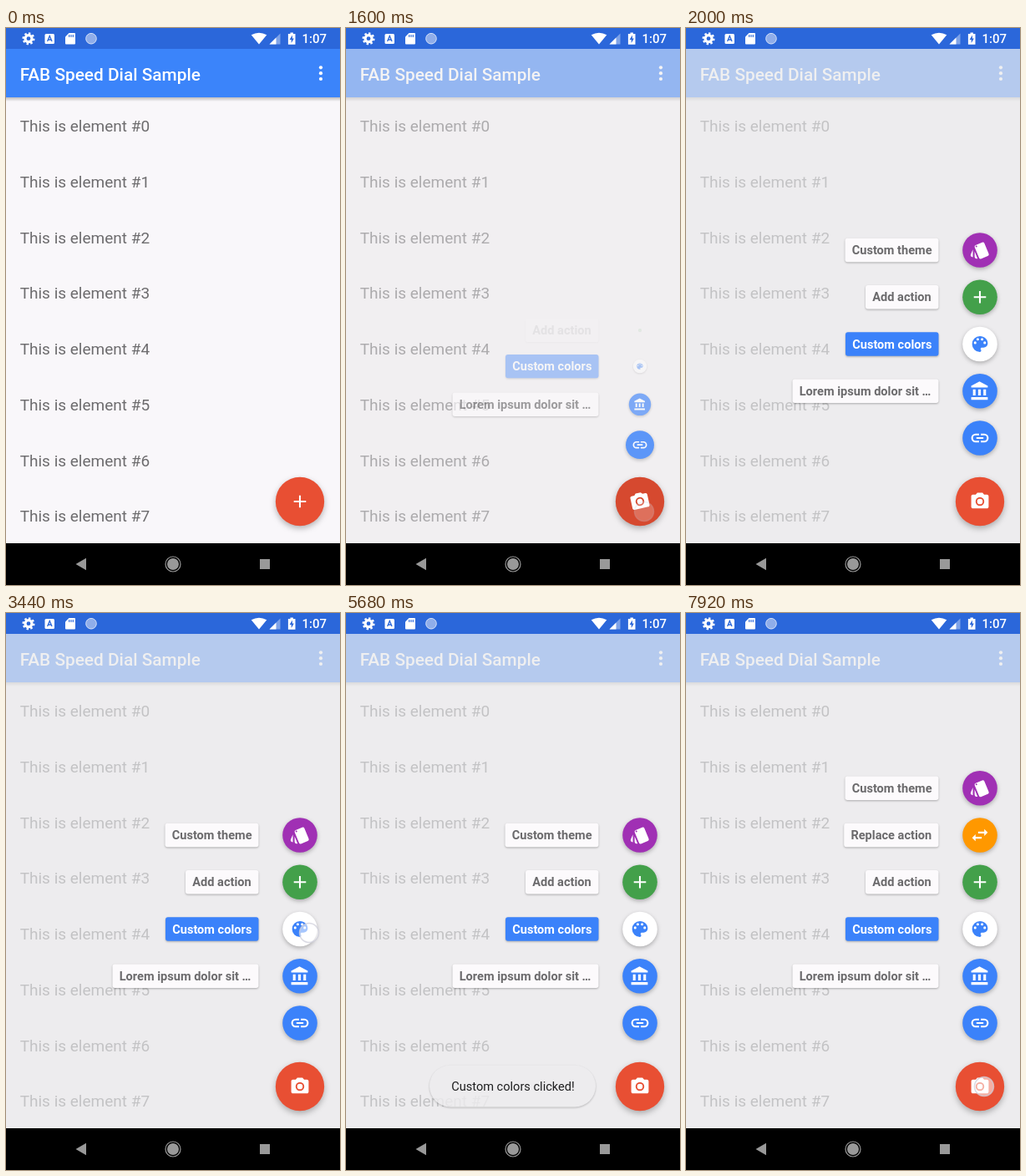
Recreate the animation shown at these times as an HTML page. Size 400 by 667 pixels, loop 8000 ms.

```html
<!DOCTYPE html>
<html lang="en">
<head>
<meta charset="utf-8">
<title>FAB Speed Dial Sample</title>
<style>
  html, body { margin: 0; height: 100%; overflow: hidden; background: #f9f7fa; }
  svg { display: block; width: 100vw; height: 100vh; font-family: Roboto, sans-serif; }
  .title { font-size: 20.83px; font-weight: 500; fill: #fff; }
  .row { font-size: 19px; fill: #6d6c6e; }
  .label { font-size: 14.58px; font-weight: 700; }
  .card { filter: drop-shadow(0 1px 1px rgba(0, 0, 0, .28)); }
  .fab { filter: drop-shadow(0 2px 2.5px rgba(0, 0, 0, .27)); }
  .main { filter: drop-shadow(0 3px 3.5px rgba(0, 0, 0, .28)); }
</style>
</head>
<body>
<svg id="stage" viewBox="0 0 400 667">
  <defs>
    <linearGradient id="shade" x2="0" y2="1">
      <stop stop-opacity=".24"/><stop offset="1" stop-opacity="0"/>
    </linearGradient>
  </defs>
  <rect width="400" height="667" fill="#f9f7fa"/>
  <g id="rows"></g>
  <rect y="83" width="400" height="5" fill="url(#shade)"/>
  <rect y="25" width="400" height="58" fill="#3b84fa"/>
  <text class="title" x="16.7" y="62.5">FAB Speed Dial Sample</text>
  <g fill="#fff">
    <circle cx="377" cy="47.3" r="2.1"/><circle cx="377" cy="54.2" r="2.1"/><circle cx="377" cy="61" r="2.1"/>
  </g>
  <rect id="overlay" y="25" width="400" height="592" fill="#e9e8ea"/>

  <g id="status">
    <rect width="400" height="25" fill="#2b67da"/>
    <g fill="none" stroke="#fff">
      <circle cx="27" cy="12.7" r="4" stroke-width="3.2"/>
      <circle cx="27" cy="12.7" r="6.3" stroke-width="2.4" pathLength="16" stroke-dasharray="1"/>
    </g>
    <rect x="46.5" y="7" width="11.5" height="12" rx="1.5" fill="#fff"/>
    <path d="M49.6 16l2.7-6.6 2.7 6.6M50.6 14h3.4" fill="none" stroke="#2b67da" stroke-width="1.3"/>
    <path d="M75.500 6H82q1 0 1 1v11.500q0 1-1 1H72q-1 0-1-1V10.500z" fill="#fff"/>
    <path d="M75.700 8v3M78 8v3M80.300 8v3" stroke="#2b67da" stroke-width="1.1"/>
    <circle cx="102" cy="12.700" r="6.300" fill="#8fadea" stroke="#d5e1f8"/>
    <path d="M303 19.500L293.700 8.300q9.300-5.200 18.600 0z" fill="#fff"/>
    <path d="M315.500 19.500h13v-13z" fill="#7fa3e8"/>
    <path d="M315.500 19.500h8v-8z" fill="#fff"/>
    <path d="M340.500 5.500h3.400v1.500h2.600v12.800h-8.600V7h2.600z" fill="#fff"/>
    <path d="M342.900 8.500l-3.300 5.500h2.100v4l3.200-5.500h-2z" fill="#2b67da"/>
    <text x="354.500" y="18.300" font-size="15" font-weight="500" fill="#fff">1:07</text>
  </g>

  <g id="items"></g>
  <g id="mainFab"></g>

  <g id="toast">
    <rect class="card" x="100" y="541.500" width="199" height="50" rx="25" fill="#eeedef" opacity=".8"/>
    <text x="200" y="572" font-size="14.580" text-anchor="middle" fill="#1f1f20">Custom colors clicked!</text>
  </g>
  <circle id="tap" r="11.500" fill="#fff" fill-opacity=".55" stroke="#cdcdd9" stroke-opacity=".75" stroke-width="1.500"/>

  <rect y="617" width="400" height="50"/>
  <g fill="#999">
    <path d="M83.500 642l12.500-7.200v14.400z"/>
    <circle cx="200" cy="642" r="7"/>
    <circle cx="200" cy="642" r="9" fill="none" stroke="#999" stroke-width="1.200"/>
    <rect x="304" y="636" width="12" height="12"/>
  </g>
</svg>
<script>
const $ = id => document.getElementById(id);
const clamp = v => Math.min(1, Math.max(0, v));
const smooth = u => u * u * (3 - 2 * u);
const set = (el, attrs) => { for (const k in attrs) el.setAttribute(k, attrs[k]); };

// Icons live on a 24 unit grid.
const icons = {
  add: '<path d="M19 13h-6v6h-2v-6H5v-2h6V5h2v6h6v2z"/>',
  camera: '<circle cx="12" cy="12" r="3.2"/><path d="M9 2L7.170 4H4c-1.100 0-2 .9-2 2v12c0 1.100.9 2 2 2h16c1.100 0 2-.9 2-2V6c0-1.100-.9-2-2-2h-3.170L15 2zm3 15a5 5 0 1 1 0-10 5 5 0 0 1 0 10z"/>',
  link: '<path d="M11 8H7a4 4 0 0 0 0 8h4M13 8h4a4 4 0 0 1 0 8h-4M8 12h8" fill="none" stroke="#fff" stroke-width="2"/>',
  bank: '<path d="M4 10h3v7H4zM10 10h3v7h-3zM16 10h3v7h-3zM2 19h19v3H2zM11.500 1L2 6v2h19V6z"/>',
  palette: '<path d="M12 3a9 9 0 0 0 0 18c.83 0 1.500-.67 1.500-1.500 0-.39-.15-.74-.39-1.010-.23-.26-.38-.61-.38-.99 0-.83.67-1.500 1.500-1.500H16c2.760 0 5-2.240 5-5 0-4.420-4.030-8-9-8z"/>' +
    [[6.5, 10.5], [9.5, 6.5], [14.5, 6.5], [17.5, 10.5]].map(([x, y]) => `<circle cx="${x}" cy="${y}" r="1.5" fill="#fff"/>`).join(''),
  swap: '<path d="M7 11l-4 4 4 4v-3h7v-2H7zM21 9l-4-4v3h-7v2h7v3z"/>',
  cards: '<rect x="8" y="4" width="12" height="17" rx="2" transform="rotate(-22.500 14 12.300)"/><path d="M3.870 20.200l-1.340-.55a2 2 0 0 1-1.090-2.600l2.430-5.870zM5.880 13.400l3.450 8.350H7.880a2 2 0 0 1-2-2z"/><circle cx="7.900" cy="7.750" r="1" fill="#a030b4"/>'
};
const icon = (name, color) => `<g fill="${color}" transform="scale(1.0417) translate(-12 -12)">${icons[name]}</g>`;

const PITCH = 56.25, FIRST_Y = 491, INSERT_AT = 5860, GROW = 265;
const slotY = slot => FIRST_Y - PITCH * slot;

const items = [
  { icon: 'link', color: '#3b82fa', slot: 0 },
  { icon: 'bank', color: '#3b82fa', slot: 1, text: 'Lorem ipsum dolor sit …', left: 127.5 },
  { icon: 'palette', color: '#fff', ink: '#3b82fa', slot: 2, text: 'Custom colors', left: 191, card: '#3b82fa', textColor: '#fff', pressed: 3440 },
  { icon: 'add', color: '#43a04a', slot: 3, text: 'Add action', left: 215, pressed: 5720 },
  { icon: 'cards', color: '#a030b4', slot: 4, text: 'Custom theme', left: 190.5, pushed: true },
  { icon: 'swap', color: '#ff9800', slot: 4, text: 'Replace action', left: 189.2, start: INSERT_AT }
];
const taps = [[357, 579, 1400], [363, 383, 3440], [357, 326, 5720], [357, 567, 7920]];

$('rows').innerHTML = Array.from({ length: 8 }, (_, i) =>
  `<text class="row" x="16.7" y="${124.3 + i * 66.7}">This is element #${i}</text>`).join('');

$('items').innerHTML = items.map(it => `<g>
  ${it.text ? `<rect class="card" x="${it.left}" y="-14.2" width="${302.5 - it.left}" height="28.4" rx="3" fill="${it.card || '#fcfafc'}"/>
  <text class="label" x="${it.left + 8.2}" y="5.2" fill="${it.textColor || '#6b6a6c'}">${it.text}</text>` : ''}
  <g class="disc"><circle class="fab" r="20.83" fill="${it.color}"/>${icon(it.icon, it.ink || '#fff')}
  <circle class="press" r="20.83"/></g></g>`).join('');
items.forEach((it, i) => {
  it.el = $('items').children[i];
  it.disc = it.el.querySelector('.disc');
  it.press = it.el.querySelector('.press');
});

set($('mainFab'), { transform: 'translate(352 567)' });
$('mainFab').innerHTML = `<circle class="main" r="29.17" fill="#e84f33"/><circle id="mainPress" r="29.17"/>
  <g id="plus">${icon('add', '#fff')}</g><g id="camera">${icon('camera', '#fff')}</g>`;

const pressShade = (t, down) => .08 * clamp((t - down) / 80) * clamp((down + 600 - t) / 220);

function draw(t) {
  const open = smooth(clamp((t - 1450) / 230));
  set($('overlay'), { opacity: .7 * open });
  set($('plus'), { opacity: open ? 0 : 1 });
  set($('camera'), { opacity: open ? 1 : 0, transform: `rotate(${-45 * (1 - open)})` });
  set($('mainPress'), { opacity: pressShade(t, 1400) + pressShade(t, 7920) });

  for (const it of items) {
    const u = clamp((t - (it.start || 1450 + 46 * it.slot)) / GROW);
    const p = 1 - (1 - u) ** 2;
    const slot = it.slot + (it.pushed && t >= INSERT_AT ? 1 : 0);
    set(it.el, { opacity: p, transform: `translate(0 ${slotY(slot) + 44 * (1 - p)})` });
    set(it.disc, { transform: `translate(352 0) scale(${p})` });
    set(it.press, { opacity: it.pressed ? pressShade(t, it.pressed) : 0 });
  }

  set($('toast'), { opacity: clamp((t - 3640) / 500) * clamp((6190 - t) / 500) });

  const [x, y, down] = taps.findLast(tap => t >= tap[2]) || [0, 0, -1000];
  set($('tap'), { cx: x, cy: y, opacity: clamp((down + 280 - t) / 200) });
}

function tick() {
  draw(performance.now() % 8000);
  requestAnimationFrame(tick);
}
tick();
</script>
</body>
</html>
```
